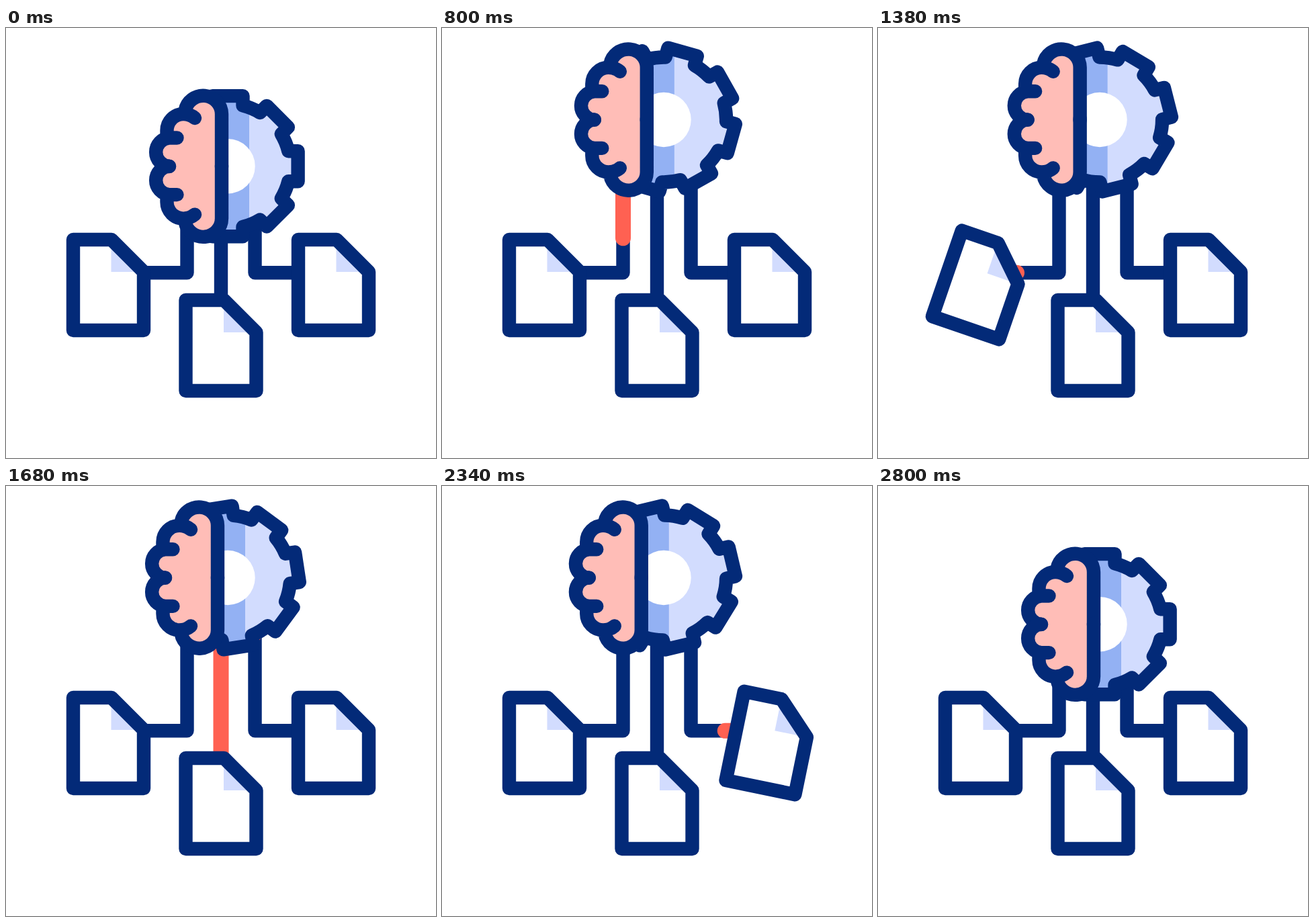
Write an HTML page that moves like this. It is 640 px wide and 640 px high and loops after 3000 ms.

```html
<!DOCTYPE html>
<html lang="en">
<head>
<meta charset="utf-8">
<title>Shared knowledge</title>
<style>
  html, body { margin: 0; width: 100%; height: 100%; overflow: hidden; background: #fff; }
  svg { display: block; width: 100vw; height: 100vh; }
  .ink { fill: none; stroke: #032a78; stroke-width: 20.4; stroke-linecap: round; stroke-linejoin: round; }
  .signal { fill: none; stroke: #ff6152; stroke-width: 23; stroke-linecap: round; stroke-linejoin: round; }
  .paper { fill: #fff; }
  .pale { fill: #d2dcfe; }
  .shade { fill: #93b1f3; }
  .pink { fill: #ffbdb7; }
</style>
</head>
<body>
<svg viewBox="0 0 640 640">
  <defs>
    <clipPath id="side"><rect id="sideRect" x="290" y="60" width="260" height="300"/></clipPath>
    <clipPath id="gearClip"><path class="gear"/></clipPath>
    <g id="doc">
      <path class="paper" d="M-52.5-67.5H4.5L52.5-19.5V67.5H-52.5z"/>
      <path class="pale" d="M4-67.5V-19.5H52.5z"/>
      <path class="ink" d="M-52.5-67.5H4.5L52.5-19.5V67.5H-52.5z"/>
    </g>
    <path id="lobeFill" class="pink" d="M321 128A27.5 27.5 0 0 0 266.5 123L264 128A24.5 24.5 0 0 0 239.5 152.5V163.5H243A21.3 21.3 0 0 0 243 206V208H321z"/>
    <path id="lobeInk" class="ink" d="M321 207V128A27.5 27.5 0 0 0 266.5 123M281 134Q274 128 264 128A24.5 24.5 0 0 0 239.5 152.5V161M254.5 163.5H243A21.3 21.3 0 0 0 243 206"/>
  </defs>

  <g id="wires"></g>
  <g id="docs"></g>

  <g id="head">
    <g clip-path="url(#side)">
      <path class="gear pale"/>
      <g clip-path="url(#gearClip)"><rect id="shadow" class="shade" x="300" y="80" width="62" height="250"/></g>
      <circle class="paper" cx="330" cy="205.7" r="40.7"/>
      <path class="gear ink"/>
    </g>
    <g id="brain">
      <use href="#lobeFill"/>
      <use href="#lobeFill" transform="matrix(1 0 0 -1 0 411.6)"/>
      <use href="#lobeInk"/>
      <use href="#lobeInk" transform="matrix(1 0 0 -1 0 411.6)"/>
    </g>
  </g>
</svg>
<script>
const LOOP = 3000;
const $ = id => document.getElementById(id);
const clamp = v => Math.min(1, Math.max(0, v));
const smooth = v => { v = clamp(v); return v * v * (3 - 2 * v); };

// Eased stops: [time, value] pairs
function ease(keys, t) {
  let i = 1;
  while (i < keys.length - 1 && t > keys[i][0]) i++;
  const [t0, a] = keys[i - 1], [t1, b] = keys[i];
  return a + (b - a) * smooth((t - t0) / (t1 - t0));
}

// One smooth curve through all stops, at rest at both ends
function curve(keys, t) {
  const last = keys.length - 1;
  if (t >= keys[last][0]) return keys[last][1];
  const slope = i => i < 1 || i >= last ? 0 :
    (keys[i + 1][1] - keys[i - 1][1]) / (keys[i + 1][0] - keys[i - 1][0]);
  let i = 1;
  while (t > keys[i][0]) i++;
  const [t0, a] = keys[i - 1], [t1, b] = keys[i];
  const d = t1 - t0, u = (t - t0) / d, w = 1 - u;
  return a + (b - a) * smooth(u) + d * u * w * (w * slope(i - 1) - u * slope(i));
}

const LIFT = [[0, 0], [600, -69.2], [2400, -69.2], [2800, 0]];
const SLIDE = [[600, 0], [1100, -45.6], [1600, -3], [2100, -46], [2600, 0]];
const SPIN = [[0, 0], [440, 42.5], [1120, 165.5], [1680, 261.2], [2020, 316.5], [2340, 346.6], [2800, 360]];
const TILT = [[0, 0], [200, -20], [400, 20], [600, 0]];
const TRAVEL = 400;

// hit: when the signal reaches the document
const branches = [
  { hit: 1000, x: 152.5, y: 382.5, wire: 'M269.5 195V364.3H205' },
  { hit: 1700, x: 320, y: 472.5, wire: 'M320 195V405' },
  { hit: 2000, x: 487.5, y: 382.5, wire: 'M370.5 195V364.3H435' }
];

function add(parent, tag, attrs) {
  const el = document.createElementNS('http://www.w3.org/2000/svg', tag);
  for (const k in attrs) el.setAttribute(k, attrs[k]);
  return parent.appendChild(el);
}

for (const b of branches) {
  add($('wires'), 'path', { class: 'ink', d: b.wire });
  b.signal = add($('wires'), 'path', { class: 'signal', d: b.wire, pathLength: 1 });
  b.doc = add($('docs'), 'use', { href: '#doc' });
}

function gearPath() {
  let d = '';
  for (let i = 0; i < 8; i++) {
    const a = i * Math.PI / 4, c = Math.cos(a), s = Math.sin(a);
    const p = (x, y) => `${(x * c - y * s).toFixed(2)} ${(x * s + y * c).toFixed(2)}`;
    d += (i ? 'A93 93 0 0 1 ' : 'M') + p(-22.5, -90.3) +
      'L' + p(-22.5, -104.6) + 'L' + p(22.5, -104.6) + 'L' + p(22.5, -90.3);
  }
  return d + 'A93 93 0 0 1 -22.5 -90.3z';
}

const gears = document.querySelectorAll('.gear');
gears.forEach(g => g.setAttribute('d', gearPath()));

function draw(t) {
  const slide = `translate(${ease(SLIDE, t)} 0)`;
  $('head').setAttribute('transform', `translate(0 ${ease(LIFT, t)})`);
  for (const id of ['brain', 'shadow', 'sideRect']) $(id).setAttribute('transform', slide);
  gears.forEach(g => g.setAttribute('transform', `translate(330 205.7) rotate(${curve(SPIN, t)})`));

  for (const b of branches) {
    const dt = t - b.hit;
    const front = smooth(dt / TRAVEL + 1), tail = smooth(dt / TRAVEL);
    b.signal.setAttribute('display', front > tail ? 'inline' : 'none');
    b.signal.setAttribute('stroke-dasharray', `${front - tail} 3`);
    b.signal.setAttribute('stroke-dashoffset', -tail);
    b.doc.setAttribute('transform', `translate(${b.x} ${b.y}) rotate(${ease(TILT, dt)})`);
  }
}

const start = performance.now();
function tick() {
  draw((performance.now() - start) % LOOP);
  requestAnimationFrame(tick);
}
tick();
</script>
</body>
</html>
```
